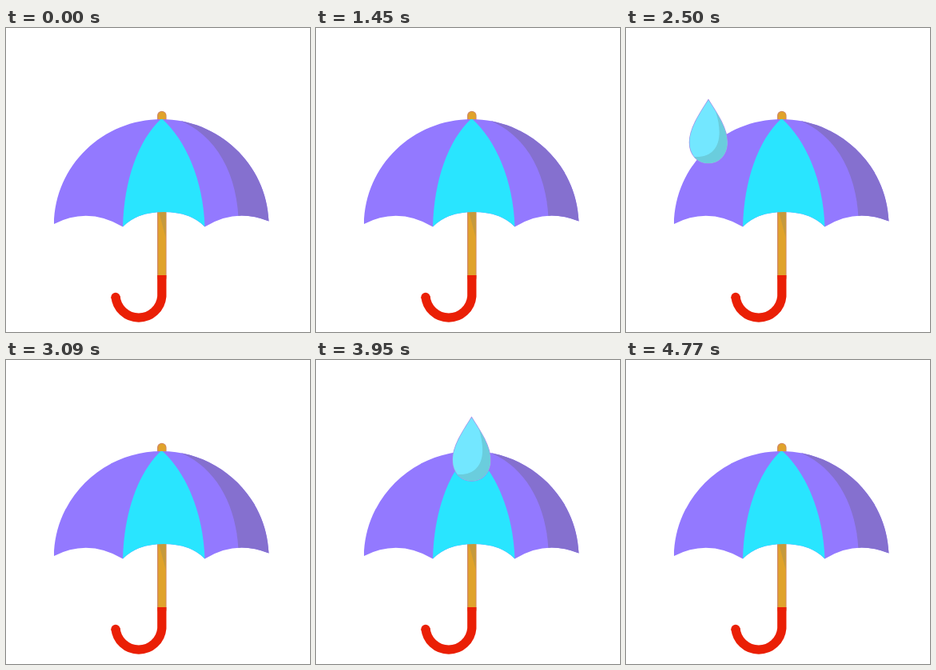
These frames come from a looping animation (380 px wide and 380 px high, 4810 ms). An HTML page:

```html
<!DOCTYPE html>
<html lang="en">
<head>
<meta charset="utf-8">
<title>Umbrella in the rain</title>
<style>
  html, body { margin: 0; width: 100%; height: 100%; overflow: hidden; background: #fff; }
  svg { display: block; width: 100%; height: 100%; }
</style>
</head>
<body>
<svg viewBox="0 0 380 380">
  <defs>
    <clipPath id="canopy">
      <path d="M60 245C61 172 121 114 194.500 114C265 114 326 170 328.500 241.500Q287 224.500 248.500 248.500Q231 230 197 230Q164 230 146 248.500Q103 223 60 245Z"/>
    </clipPath>
    <path id="outline" d="M0 0C9 14 23.500 35 23.500 53C23.500 69 13 79 0 79C-13 79 -23.500 69 -23.500 53C-23.500 35 -9 14 0 0Z"/>
    <clipPath id="dropShape"><use href="#outline"/></clipPath>
    <g id="drop">
      <use href="#outline" fill="none" stroke="#a58be6" stroke-width="1.500"/>
      <g clip-path="url(#dropShape)">
        <rect x="-25" width="50" height="80" fill="#73e7ff"/>
        <path d="M9 14C21 52 9 73 -18 71V82H26V14Z" fill="#6acddd"/>
      </g>
    </g>
  </defs>

  <g fill="none" stroke-linecap="round">
    <path d="M194.800 109.500V312" stroke="#cf8462" stroke-width="11.500"/>
    <path d="M195 109.500V312" stroke="#e0a32b" stroke-width="9.500"/>
  </g>
  <path d="M190.500 228H199.700V262Z" fill="#c69a3c"/>
  <path d="M194.800 309V335.500A29 29 0 0 1 137 335.500" fill="none" stroke="#ea1f05" stroke-width="11.300"/>
  <circle cx="137" cy="336.500" r="5.650" fill="#ea1f05"/>

  <g clip-path="url(#canopy)">
    <rect x="55" y="110" width="280" height="145" fill="#9379ff"/>
    <path d="M211 113C262 131 291 182 291 250H335V110Z" fill="#8570cf"/>
    <path d="M194.500 113C166 139 147 190 146 250H248.500C247 190 224 139 194.500 113Z" fill="#29e5ff"/>
  </g>

  <g id="rain"></g>
</svg>
<script>
const LOOP = 4810, FALL = 900, FADE = 220, TOP = -80;
const drops = [
  { x: 283, start: 80, end: 134.6 },
  { x: 103, start: 1802, end: 115 },
  { x: 194.5, start: 3210, end: 85.8 }
];

const rain = document.getElementById('rain');
for (const d of drops) {
  d.el = document.createElementNS('http://www.w3.org/2000/svg', 'use');
  d.el.setAttribute('href', '#drop');
  rain.append(d.el);
}

const clamp = v => Math.min(1, Math.max(0, v));
const ease = u => u * u * (3 - 2 * u);

// Each half second holds five 90 ms poses and one 50 ms pose.
function hold(t) {
  const part = t % 500;
  return t - part + Math.floor(part / 90) * 90;
}

function draw(time) {
  const t = hold(time % LOOP);
  for (const d of drops) {
    const age = t - d.start;
    const y = TOP + (d.end - TOP) * ease(clamp(age / FALL));
    const alpha = age < 0 ? 0 : 1 - clamp((age - FALL) / FADE);
    d.el.setAttribute('transform', `translate(${d.x} ${y})`);
    d.el.setAttribute('opacity', alpha);
  }
}

const begin = performance.now();
function tick() {
  draw(performance.now() - begin);
  requestAnimationFrame(tick);
}
tick();
</script>
</body>
</html>
```
